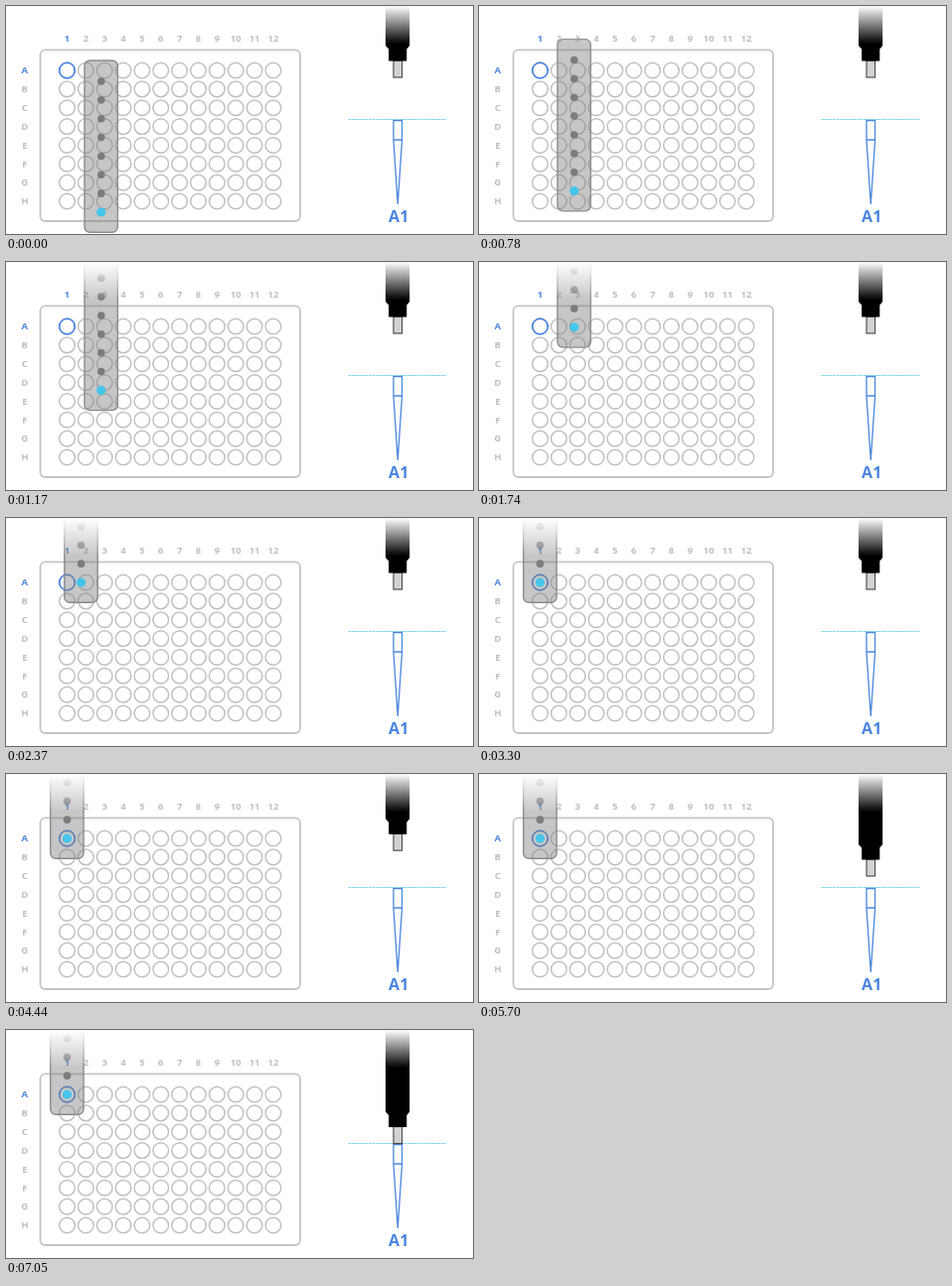
Animation, 470 px wide and 230 px high, one loop 9 s. Source, as an HTML page:

```html
<!DOCTYPE html>
<html lang="en">
<head>
<meta charset="utf-8">
<title>Tip pickup</title>
<style>
  html, body { margin: 0; width: 100%; height: 100%; overflow: hidden; background: #fff; }
  svg { display: block; }
  text { font: bold 9.5px "Open Sans", sans-serif; text-anchor: middle; fill: #bfbfbf; }
  .well { fill: none; stroke: #c1c1c1; stroke-width: 1.5; }
  .well.active { stroke: #4380dc; stroke-width: 1.7; }
  text.active { fill: #4a86e0; }
</style>
</head>
<body>
<svg width="470" height="230" viewBox="0 0 470 230">
  <defs>
    <linearGradient id="fade" gradientUnits="userSpaceOnUse" x1="0" y1="0" x2="0" y2="38">
      <stop offset="0" stop-color="#fff" stop-opacity="0"/>
      <stop offset="1" stop-color="#fff"/>
    </linearGradient>
    <mask id="topFade" maskUnits="userSpaceOnUse" x="0" y="0" width="470" height="230">
      <rect width="470" height="230" fill="url(#fade)"/>
    </mask>
  </defs>

  <rect x="34.5" y="44.3" width="261.5" height="172.7" rx="5" fill="none" stroke="#c4c4c4" stroke-width="1.8"/>
  <g id="plate"></g>

  <g mask="url(#topFade)">
    <g id="head">
      <rect x="79" y="55" width="33.4" height="173.3" rx="5.5" fill="#828282" fill-opacity=".45" stroke="#8b8b8b" stroke-width="1.4"/>
    </g>
  </g>

  <path id="deckLine" fill="none" stroke="#5fcdec" stroke-width="1" stroke-dasharray="2 1"/>
  <g fill="none" stroke="#4a87dc" stroke-width="1.3">
    <path d="M390 115.5H398.6V135H390Z M390 135L394.3 200L398.6 135"/>
  </g>
  <text class="active" x="395.2" y="218" style="font-size:16px">A1</text>

  <g mask="url(#topFade)">
    <g id="pipette">
      <rect x="390" y="55" width="8.6" height="17" fill="#d2d2d2" stroke="#444" stroke-width="1.1"/>
      <path d="M382 -60H406.2V40L403.3 43.5V55.5H385.2V43.5L382 40Z"/>
    </g>
  </g>
</svg>
<script>
const LOOP = 9000, PITCH = 18.86, LEFT = 61.5, TOP = 65;
const byId = id => document.getElementById(id);

function add(parent, tag, attrs, text = "") {
  const node = document.createElementNS("http://www.w3.org/2000/svg", tag);
  for (const key in attrs) node.setAttribute(key, attrs[key]);
  node.textContent = text;
  parent.append(node);
}

const plate = byId("plate"), head = byId("head");
const state = on => on ? "active" : "idle";

for (let col = 0; col < 12; col++) {
  const x = LEFT + col * PITCH;
  add(plate, "text", { x, y: 35.6, class: state(!col) }, col + 1);
  for (let row = 0; row < 8; row++)
    add(plate, "circle", { cx: x, cy: TOP + row * PITCH, r: 7.8, class: "well " + state(!row && !col) });
}
[..."ABCDEFGH"].forEach((letter, row) => {
  const y = TOP + row * PITCH;
  add(plate, "text", { x: 18.8, y: y + 3.3, class: state(!row) }, letter);
  const last = row === 7;
  add(head, "circle", { cx: 95.8, cy: y + 11, r: last ? 4.6 : 3.8, fill: last ? "#45c5ec" : "#7c7c7c" });
});

// Eased interpolation through [time, value] keys; equal values hold.
function track(keys, time) {
  if (time <= keys[0][0]) return keys[0][1];
  for (let i = 1; i < keys.length; i++) {
    const [t0, v0] = keys[i - 1], [t1, v1] = keys[i];
    if (time < t1) {
      const p = (time - t0) / (t1 - t0);
      return v0 + (v1 - v0) * p * p * (3 - 2 * p);
    }
  }
  return keys[keys.length - 1][1];
}

const headX = [[1800, 0], [2850, -35.8], [3300, -34.3]];
const headY = [[450, 0], [1800, -143]];
const pipetteY = [
  [4050, 0], [5400, 25.5], [5550, 25.5], [5700, 31], [5850, 31], [6000, 36.5],
  [6300, 36.5], [6450, 44.5], [6750, 42.5]
];
const lineHalf = [[6300, 49.5], [6600, 73], [7050, 49.5]];

function draw(now) {
  const time = now % LOOP;
  const half = track(lineHalf, time);
  head.setAttribute("transform", `translate(${track(headX, time)} ${track(headY, time)})`);
  byId("pipette").setAttribute("transform", `translate(0 ${track(pipetteY, time)})`);
  byId("deckLine").setAttribute("d", `M${394.2 - half} 114.5H${394.2 + half}`);
}

let start;
function tick(now) {
  start ??= now;
  draw(now - start);
  requestAnimationFrame(tick);
}
draw(0);
requestAnimationFrame(tick);
</script>
</body>
</html>
```
